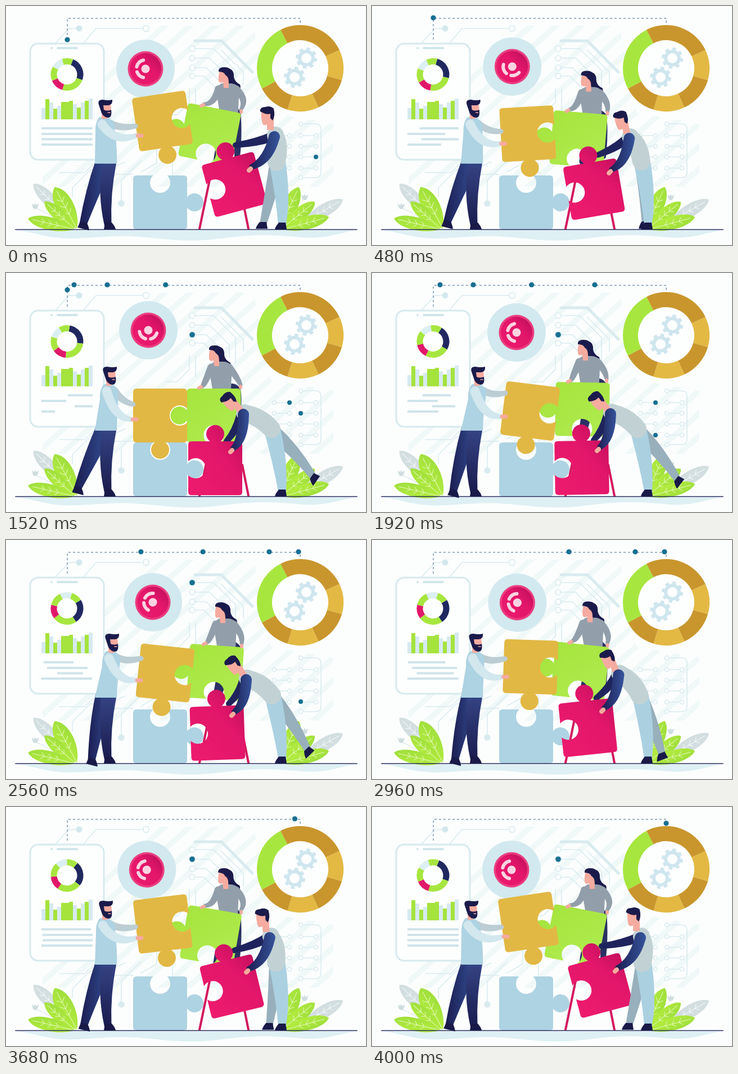
Animation, 640 px wide and 426 px high, one loop 4080 ms. Source, as an HTML page:

```html
<!DOCTYPE html>
<html lang="en">
<head>
<meta charset="utf-8">
<title>Puzzle teamwork</title>
<style>
  html, body { margin: 0; width: 100%; height: 100%; overflow: hidden; background: #fcfefe; }
  svg { display: block; width: 100%; height: 100%; }
</style>
</head>
<body>
<svg viewBox="0 0 640 426" fill="none" stroke-linecap="round" stroke-linejoin="round">
  <defs>
    <pattern id="stripes" width="30" height="30" patternUnits="userSpaceOnUse" patternTransform="rotate(48)">
      <rect width="10" height="30" fill="#f0f8f8"/>
    </pattern>
    <linearGradient id="navy"><stop stop-color="#1b1c50"/><stop offset="1" stop-color="#36549b"/></linearGradient>
    <linearGradient id="navyDown" x2="0" y2="1"><stop stop-color="#38488a"/><stop offset="1" stop-color="#191a4b"/></linearGradient>
    <linearGradient id="pink" x1="0" y1="1" x2="1" y2="0"><stop stop-color="#ee1b6e"/><stop offset=".6" stop-color="#e2166a"/><stop offset="1" stop-color="#b90d58"/></linearGradient>
    <linearGradient id="leaf" x2="1" y2="1"><stop stop-color="#b9f03f"/><stop offset="1" stop-color="#9cdc3c"/></linearGradient>
    <linearGradient id="lime" x2="1" y2="1"><stop stop-color="#a4e33c"/><stop offset="1" stop-color="#b0ec50"/></linearGradient>
  </defs>

  <path fill="url(#stripes)" d="M65 165L200 100L262 35H440L470 190L582 210V322H65Z"/>

  <!-- circuits -->
  <g stroke="#d9ebef" stroke-width="1.6">
    <path d="M88 66L112 40H126M137 67L160 40H244"/>
    <circle cx="249" cy="40" r="5.5" fill="#fcfefe"/>
    <circle cx="130" cy="40" r="5" fill="#d3e8ed"/>
    <path d="M336 76H369L408 115V160M336 93H362L397 128V150M336 110H356L385 139M336 125H352L374 147M422 140V118L382 78"/>
    <path d="M336 62H383L438 118" stroke-width="5"/>
    <path d="M326 147V172L304 194H285M337 148V185"/>
    <path d="M212 278L180 292H150L118 324V340M226 300H194L160 334M205 347V310L240 276M95 297H140L160 277M296 276V300M268 255V280L240 296"/>
    <circle cx="205" cy="352" r="5" fill="#d9ebef"/>
    <path d="M524 210H550Q560 210 560 220V296Q560 306 550 306H524"/>
    <circle cx="524" cy="210" r="3.5" fill="#fcfefe"/><circle cx="524" cy="306" r="3.5" fill="#fcfefe"/>
    <g id="nodes"></g>
  </g>

  <!-- phone -->
  <rect x="43" y="67" width="131" height="207" rx="14" fill="#fdfefe" stroke="#d7eaee" stroke-width="3"/>
  <path d="M81 75h.1M92 75H126" stroke="#d0e6eb" stroke-width="4"/>
  <g id="pie" stroke-width="11" stroke-linecap="butt"></g>
  <g id="bars"></g>
  <path id="lines" stroke="#cfe4ea" stroke-width="4" stroke-linecap="butt"/>

  <path d="M109 60V22H523V34" stroke="#7d9ab2" stroke-width="1.5" stroke-dasharray="4 4" stroke-linecap="butt"/>

  <!-- large ring -->
  <circle cx="523" cy="111" r="60" fill="#fdfefe"/>
  <g id="ring" stroke-width="27" stroke-linecap="butt"></g>
  <g id="gears" stroke="#cfe6ee" stroke-linecap="butt"></g>

  <!-- badge -->
  <g id="badge">
    <circle r="52" fill="#d2e9ef"/>
    <circle r="31.5" fill="#ea3f80"/>
    <circle r="28" fill="url(#pink)"/>
    <g id="icon" stroke="#fcd3e2" stroke-width="6"><circle r="7.5" fill="#fcd3e2" stroke="none"/></g>
  </g>
  <g id="dots" fill="#186f91"></g>

  <!-- ground -->
  <path d="M18 400C50 402 75 417 130 414S200 408 255 413S330 421 385 414S470 407 520 412S595 403 622 400Z" fill="#def0f4"/>
  <g id="plants"></g>

  <!-- woman -->
  <path id="wLegs" fill="#2a3163"/>
  <path id="wHair" fill="#1b1b4b"/>
  <path id="wBody" fill="#929fab"/>
  <g id="wHead">
    <path d="M-7-8Q-9 0-8 8Q-6 12 0 10L1 20H10V-2L5-12Z" fill="#f5ab9f"/>
    <path d="M-8-9Q-9-17 2-17Q15-17 16-5Q17 5 10 10Q10 0 4-3Q2-9-8-9Z" fill="#1b1b4b"/>
  </g>

  <!-- back arm, stand, pieces -->
  <path id="green" fill="url(#lime)"/>
  <path d="M362 310L344 397M420 342L431 397" stroke="#d3195f" stroke-width="4"/>
  <path id="blue" fill="#aed3e2" transform="translate(274 350)"/>
  <path id="yellow" fill="#e2b844"/>
  <path id="rFarArm" fill="#20245c"/>
  <path id="pinkPiece" fill="url(#pink)"/>
  <path id="wArms" fill="#929fab"/>
  <path id="wHands" stroke="#f5ab9f" stroke-width="6"/>

  <path d="M17 398.5H624" stroke="#252b5c" stroke-width="1.7"/>

  <!-- man on the left -->
  <path id="lFarArm" fill="#bccdd3"/>
  <path id="lBackLeg" fill="url(#navy)"/>
  <path id="lLeg" fill="url(#navyDown)"/>
  <path class="shoe" id="lShoe" fill="#191a48"/>
  <path class="shoe" id="lBackShoe" fill="#191a48"/>
  <path id="lBody" fill="#aed3e2"/>
  <path id="lArm" fill="#d2e7ee"/>
  <path id="lHand" stroke="#f5ab9f" stroke-width="7"/>
  <g id="lHead">
    <path d="M9-8Q12 0 10 8L4 14V20H-6V-8Z" fill="#f5ab9f"/>
    <path d="M-11-5Q-14-14-4-14Q6-12 13-14Q14-5 6-4H-3L-2 4Q4 7 11 4Q13 18 5 18Q-5 17-8 4Z" fill="#1b1b4b"/>
    <path d="M5 9H9" stroke="#f5ab9f" stroke-width="1.5"/>
  </g>

  <!-- man on the right -->
  <path id="rFarLeg" fill="#98afbc"/>
  <path class="shoe" id="rFarShoe" fill="#191a48"/>
  <path id="rLeg" fill="#abd1e1"/>
  <path class="shoe" id="rShoe" fill="#191a48"/>
  <path id="rBody" fill="#c2d2d4"/>
  <g id="rHead">
    <path d="M-9-8Q-10 2-7 13Q-4 17 1 14V24H13V-8Z" fill="#f5ab9f"/>
    <path d="M-11-9Q-12-17-2-17Q7-20 13-14Q16 0 11 7L7 3V-5Q0-3-7-7Z" fill="#1b1b4b"/>
  </g>
  <path id="rArm" fill="url(#navy)"/>
  <path id="rHand" stroke="#f5ab9f" stroke-width="8"/>
</svg>

<script>
const LOOP = 4080, STEP = 80;
const KEYS = [0, 880, 1520, 1920, 2560, 3360, 4000];
const $ = id => document.getElementById(id);
const put = (id, name, value) => $(id).setAttribute(name, value);
const shape = (id, d) => put(id, 'd', d);
const place = (id, x, y, r = 0, extra = '') => put(id, 'transform', `translate(${x} ${y}) rotate(${r}) ${extra}`);

// Monotone cubic through values at the given times, flat at both ends.
function curve(values, times) {
  const n = times.length - 1;
  const slope = i => (values[i + 1] - values[i]) / (times[i + 1] - times[i]);
  const tangent = i => {
    if (i === 0 || i === n) return 0;
    const a = slope(i - 1), b = slope(i);
    return a * b <= 0 ? 0 : 2 * a * b / (a + b);
  };
  return t => {
    if (t <= times[0]) return values[0];
    if (t >= times[n]) return values[n];
    let i = 0;
    while (t > times[i + 1]) i++;
    const h = times[i + 1] - times[i], u = (t - times[i]) / h, v = 1 - u;
    return v * v * (1 + 2 * u) * values[i] + u * u * (3 - 2 * u) * values[i + 1]
      + h * u * v * (v * tangent(i) - u * tangent(i + 1));
  };
}
const cycle = (...v) => curve([...v, v[0]], KEYS);

function arc(cx, cy, r, from, to) {
  const p = a => `${cx + r * Math.cos(a * Math.PI / 180)} ${cy + r * Math.sin(a * Math.PI / 180)}`;
  return `M${p(from)}A${r} ${r} 0 ${to - from > 180 ? 1 : 0} 1 ${p(to)}`;
}

// Tapered limb through three joints, each [x, y, width].
function limb(a, b, c) {
  const off = (p, from, to, side) => {
    const dx = to[0] - from[0], dy = to[1] - from[1], k = side * p[2] / 2 / (Math.hypot(dx, dy) || 1);
    return [p[0] - dy * k, p[1] + dx * k];
  };
  const edge = s => [off(a, a, b, s), off(b, a, c, s), off(c, b, c, s)];
  const bend = ([p, q, r]) => [2 * q[0] - (p[0] + r[0]) / 2, 2 * q[1] - (p[1] + r[1]) / 2];
  const l = edge(1), r = edge(-1).reverse();
  return `M${l[0]}Q${bend(l)} ${l[2]}A${c[2] / 2} ${c[2] / 2} 0 0 0 ${r[0]}Q${bend(r)} ${r[2]}A${a[2] / 2} ${a[2] / 2} 0 0 0 ${l[0]}Z`;
}

// Sides run top, right, bottom, left: 1 is a knob, -1 a hole, 0 straight.
function piece(...sides) {
  const turn = (x, y, n) => n ? turn(-y, x, n - 1) : `${x} ${y}`;
  let d = `M${turn(-42, -48, 0)}`;
  sides.forEach((s, i) => {
    const r = s > 0 ? 16 : 18, w = s > 0 ? 9.3 : 12.4;
    if (s) d += `L${turn(-w, -48, i)}A${r} ${r} 0 1 ${s > 0 ? 1 : 0} ${turn(w, -48, i)}`;
    d += `L${turn(42, -48, i)}Q${turn(48, -48, i)} ${turn(48, -42, i)}`;
  });
  return d + 'Z';
}

shape('blue', piece(-1, 1, 0, 0));
shape('yellow', piece(0, -1, 1, 0));
shape('green', piece(0, 0, -1, 1));
shape('pinkPiece', piece(1, 0, 0, -1));
document.querySelectorAll('.shoe').forEach(s => s.setAttribute('d', 'M-6-4H6L8 8H-13Q-12 3-6-4Z'));

const sectors = (cx, cy, r, list) => list.map(([from, to, color]) =>
  `<path d="${arc(cx, cy, r, from, to)}" stroke="${color}"/>`).join('');
$('ring').innerHTML = sectors(523, 111, 63.5, [
  [152, 243, '#a7e63f'], [243, 335, '#c9962d'], [335, 376, '#e3b944'],
  [376, 425, '#c9962d'], [65, 107, '#e3b944'], [107, 152, '#c9962d']]);
$('pie').innerHTML = sectors(0, 0, 23.5, [
  [-80, 8, '#20285f'], [8, 95, '#a7e63f'], [95, 145, '#e0186a'],
  [145, 197, '#a7e63f'], [197, 240, '#dceff3'], [240, 280, '#a7e63f']]);
$('gears').innerHTML = [[534, 93], [513, 127]].map(([x, y]) =>
  `<circle cx="${x}" cy="${y}" r="12" stroke-width="6"/>
   <circle cx="${x}" cy="${y}" r="16.5" stroke-width="5" pathLength="16" stroke-dasharray="1 1"/>`).join('');
$('icon').innerHTML += `<path d="${arc(0, 0, 16, 104, 160)}${arc(0, 0, 16, 193, 256)}"/>`;
$('bars').innerHTML = [20, 36, 30, 19, 24, 31, 31, 33, 27, 21, 30, 33, 37].map((h, i) =>
  `<rect x="${63 + 7 * i}" y="${202 - h}" width="7" height="${h}" fill="${i % 2 || i === 6 ? '#a5e33d' : '#d6eaf0'}"/>`).join('');

let nodes = '';
const node = (x, y, r) => `<circle cx="${x}" cy="${y}" r="${r}" fill="#fcfefe"/>`;
for (const y of [76, 93, 110, 125]) nodes += node(331, y, 5);
for (const y of [231, 250, 269, 289])
  for (const x of [477, 524]) nodes += `<path d="M${x} ${y}h27"/>` + node(x, y, 3.5) + node(x + 27, y, 3.5);
$('nodes').innerHTML = nodes;

// Leaf from its root, with length, half width and angle.
function leaf(x, y, len, w, angle, color = 'url(#leaf)', vein = '#e5f9bd') {
  let ribs = `M0 0L${len * .9} 0`;
  for (let k = .35; k < .8; k += .15) ribs += `M${len * k} 0l${w * .5} ${w * .5}M${len * k} 0l${w * .5} ${-w * .5}`;
  return `<g transform="translate(${x} ${y}) rotate(${angle})">
    <path d="M0 0C${len * .3} ${-w * 1.4} ${len * .85} ${-w * 1.4} ${len} 0C${len * .85} ${w * 1.4} ${len * .3} ${w * 1.4} 0 0Z" fill="${color}"/>
    <path d="${ribs}" stroke="${vein}" stroke-width="1"/></g>`;
}
const bud = (x, y) => `<path d="M${x - 6} ${y - 5}L${x - 2} ${y - 2}L${x} ${y - 6}L${x + 2} ${y - 2}L${x + 6} ${y - 5}Q${x + 5} ${y + 5} ${x} ${y + 5}T${x - 6} ${y - 5}Z" fill="#d0dddf"/>`;
const GREY = ['#d3dee0', '#f7fbfb'];
$('plants').innerHTML =
  '<path d="M52 360Q80 370 108 396M531 344Q505 365 490 396" stroke="#d0dddf"/>' +
  leaf(104, 372, 78, 11, -135, ...GREY) + leaf(126, 397, 84, 15, -118) +
  leaf(122, 397, 72, 10, -138) + leaf(122, 398, 85, 11, -167) + bud(52, 357) +
  leaf(528, 386, 82, 11, -30, ...GREY) + leaf(486, 397, 82, 13, -65) +
  leaf(490, 397, 76, 11, -39) + leaf(492, 398, 85, 11, -15) + bud(531, 341);

const pieces = {
  yellow: [cycle(278, 275.5, 274, 281, 283, 280), cycle(205, 248, 254, 246, 237, 215), cycle(-8.5, .5, 0, 7, 6, -3.5)],
  green: [cycle(362, 371, 369.5, 374, 372, 367), cycle(229, 247, 254, 243, 236, 232), cycle(11, 0, 0, 1, 4, 8)],
  pinkPiece: [cycle(406, 382, 372, 373, 376, 394), cycle(318, 337, 348, 347, 344, 324), cycle(-15, -4, 0, -1, -2, -11)],
  badge: [cycle(248, 251, 253, 257, 261, 254), cycle(112, 104, 102, 106, 111, 112)]
};
const iconTurn = cycle(0, -110, -85, 0, 16, 4);
const pieTurn = cycle(12, 0, 0, 22, 48, 48);
const textLines = [
  [218, cycle(63, 104, 110, 90, 67, 63), cycle(154, 154, 154, 140, 120, 145)],
  [228, cycle(63, 63, 63, 63, 73, 68), cycle(154, 110, 107, 117, 145, 154)],
  [237.5, cycle(63, 112, 122, 107, 91, 70), cycle(154, 154, 154, 148, 137, 154)],
  [247, cycle(63, 63, 63, 63, 63, 63), cycle(154, 95, 87, 118, 153, 154)]
];
const point = (xs, ys) => { const x = cycle(...xs), y = cycle(...ys); return t => [x(t), y(t)]; };

const woman = {
  head: point([386, 373, 369, 374, 380, 384], [126, 140, 146, 136, 128, 126]),
  left: point([348, 345, 344, 349, 352, 350], [178, 198, 205, 194, 186, 181]),
  right: point([418, 419, 417, 417, 419, 418], [189, 197, 204, 193, 190, 188])
};
const leftMan = {
  head: cycle(176, 183, 184, 188, 188, 179),
  foot: point([137, 129, 127, 144, 152, 141], [389, 385, 385, 390, 393, 390]),
  hand: point([239, 231, 230, 236, 238, 239], [231, 258, 261, 256, 250, 238]),
  far: point([230, 228, 226, 237, 240, 232], [214, 232, 234, 214, 211, 213])
};
const rightMan = {
  head: point([463, 417, 397, 400, 404, 439], [197, 216, 231, 230, 225, 203]),
  tilt: cycle(0, -25, -38, -36, -32, -8),
  neck: point([479, 438, 424, 426, 429, 457], [230, 238, 249, 248, 246, 230]),
  hip: point([481, 476, 472, 472, 473, 479], [278, 276, 278, 278, 277, 277]),
  farFoot: point([457, 519, 547, 544, 537, 488], [389, 384, 364, 369, 375, 389]),
  toe: cycle(0, -25, -55, -52, -45, 0),
  hand: point([434, 411, 401, 402, 403, 421], [292, 304, 318, 316, 312, 297]),
  far: point([408, 395, 392, 394, 396, 402], [248, 285, 300, 298, 292, 268])
};

function drawWoman(t) {
  const [hx, hy] = woman.head(t), [lx, ly] = woman.left(t), [rx, ry] = woman.right(t);
  const sx = hx * .75 + 103, sy = hy + 21, waist = hy * .9 + 80;
  place('wHead', hx, hy);
  shape('wHair', `M${hx} ${hy - 14}Q${hx + 20} ${hy - 18} ${hx + 19} ${hy}Q${hx + 20} ${hy + 9} ${hx + 30} ${hy + 14}Q${hx + 33} ${hy + 21} ${hx + 26} ${hy + 25}Q${hx + 8} ${hy + 26} ${hx + 5} ${hy + 5}Z`);
  shape('wBody', `M${sx - 9} ${sy - 9}Q${sx - 18} ${sy - 5} ${sx - 19} ${sy + 4}L${sx - 12} ${waist}H${sx + 20}L${sx + 22} ${sy + 4}Q${sx + 20} ${sy - 8} ${sx + 8} ${sy - 9}Z`);
  shape('wLegs', limb([402, waist, 29], [388, 232, 22], [376, 277, 15]) + limb([405, waist, 25], [411, 230, 15], [411, 268, 10]));
  shape('wArms', limb([sx - 15, sy + 1, 13], [sx - 25, (sy + ly) / 2 + 6, 11], [lx + 5, ly - 3, 7])
    + limb([sx + 17, sy + 1, 13], [sx + 29, (sy + ry) / 2 - 1, 11], [rx, ry - 5, 7]));
  shape('wHands', `M${lx + 3} ${ly - 2}L${lx - 1} ${ly}M${rx} ${ry - 2}V${ry}`);
}

function drawLeftMan(t) {
  const x = leftMan.head(t), s = x - 1, [fx, fy] = leftMan.foot(t);
  const [hx, hy] = leftMan.hand(t), [ax, ay] = leftMan.far(t);
  place('lHead', x, 181);
  shape('lFarArm', limb([s + 10, 209, 13], [(s + ax) / 2 + 3, (207 + ay) / 2 + 5, 12], [ax, ay, 9]));
  shape('lBackLeg', limb([174, 280, 31], [(172 + fx) / 2, 333, 24], [fx, fy, 13]));
  shape('lLeg', limb([183, 280, 26], [178, 335, 21], [181, 389, 13]));
  place('lShoe', 182, 390, 0, 'scale(-1 1)');
  place('lBackShoe', fx, fy, 14, 'scale(-1 1)');
  shape('lBody', `M${s - 9} 198Q${s - 17} 207 ${s - 16} 225L158 281H197Q198 245 ${s + 17} 211Q${s + 12} 201 ${s + 5} 198Z`);
  shape('lArm', limb([s - 4, 211, 17], [(s + hx) / 2 - 9, (211 + hy) / 2 + 12, 15], [hx - 7, hy, 9]));
  shape('lHand', `M${hx - 5} ${hy}L${hx + 2} ${hy}`);
}

function drawRightMan(t) {
  const r = rightMan, n = r.neck(t), h = r.hip(t), f = r.farFoot(t), a = r.hand(t), b = r.far(t);
  place('rHead', ...r.head(t), r.tilt(t));
  shape('rBody', limb([...n, 30], [(n[0] + h[0]) / 2 + 3, (n[1] + h[1]) / 2 - 3, 33], [...h, 32]));
  shape('rLeg', limb([h[0] + 2, h[1] + 4, 29], [(h[0] + 493) / 2 + 3, 338, 24], [491, 389, 14]));
  place('rShoe', 491, 390);
  shape('rFarLeg', limb([h[0] + 1, h[1] + 4, 27], [(h[0] + f[0]) / 2 + 2, (h[1] + f[1]) / 2 - 2, 21], [...f, 12]));
  place('rFarShoe', ...f, r.toe(t));
  shape('rArm', limb([n[0] - 2, n[1] + 3, 20], [(n[0] + a[0]) / 2 + 5, (n[1] + a[1]) / 2 + 7, 17], [a[0] + 3, a[1] - 5, 10]));
  shape('rHand', `M${a[0] + 1} ${a[1] - 2}L${a[0] - 2} ${a[1] + 1}`);
  shape('rFarArm', limb([n[0] - 6, n[1] + 3, 17], [(n[0] + b[0]) / 2, (n[1] + b[1]) / 2 + 3, 14], [...b, 10]));
}

// Four dots follow the dashed path, 400 ms apart.
const travel = curve([0, 30, 38, 50, 66, 109, 210, 325, 397, 449, 460],
  [0, 320, 480, 720, 880, 1120, 1510, 1920, 2160, 2560, 2800]);
const onPath = s => s < 38 ? [109, 60 - s] : s < 452 ? [109 + s - 38, 21] : [523, 21 + s - 452];
// Blinking nodes: x, y, on, off.
const lamps = [
  [249, 40, 640, 1200], [331, 125, 640, 1200], [331, 110, 1280, 2240], [331, 76, 2320, 2960],
  [331, 93, 3680, 4080], [504, 231, 1280, 2240], [524, 250, 1280, 1760], [504, 289, 1760, 2240],
  [524, 288, 2320, 2960], [551, 231, 3040, 3680], [551, 269, 0, 480]
];
function drawDots(t) {
  const dots = lamps.filter(l => t >= l[2] && t < l[3]).map(([x, y]) => [x, y, x > 500 ? 4 : 4.8]);
  for (let i = 0; i < 4; i++) {
    const age = t - 400 * i;
    if (age >= (i ? 100 : 0) && age <= 2800) dots.push([...onPath(travel(age)), 4.6]);
  }
  $('dots').innerHTML = dots.map(([x, y, r]) => `<circle cx="${x}" cy="${y}" r="${r}"/>`).join('');
}

function draw(t) {
  for (const id in pieces) place(id, ...pieces[id].map(f => f(t)));
  place('icon', 0, 0, iconTurn(t));
  place('pie', 108.5, 122, pieTurn(t));
  shape('lines', textLines.map(([y, from, to]) => `M${from(t)} ${y}H${to(t)}`).join(''));
  drawWoman(t);
  drawLeftMan(t);
  drawRightMan(t);
  drawDots(t);
}

const start = performance.now();
function tick() {
  const t = (performance.now() - start) % LOOP;
  draw(Math.floor(t / STEP) * STEP);
  requestAnimationFrame(tick);
}
tick();
</script>
</body>
</html>
```
